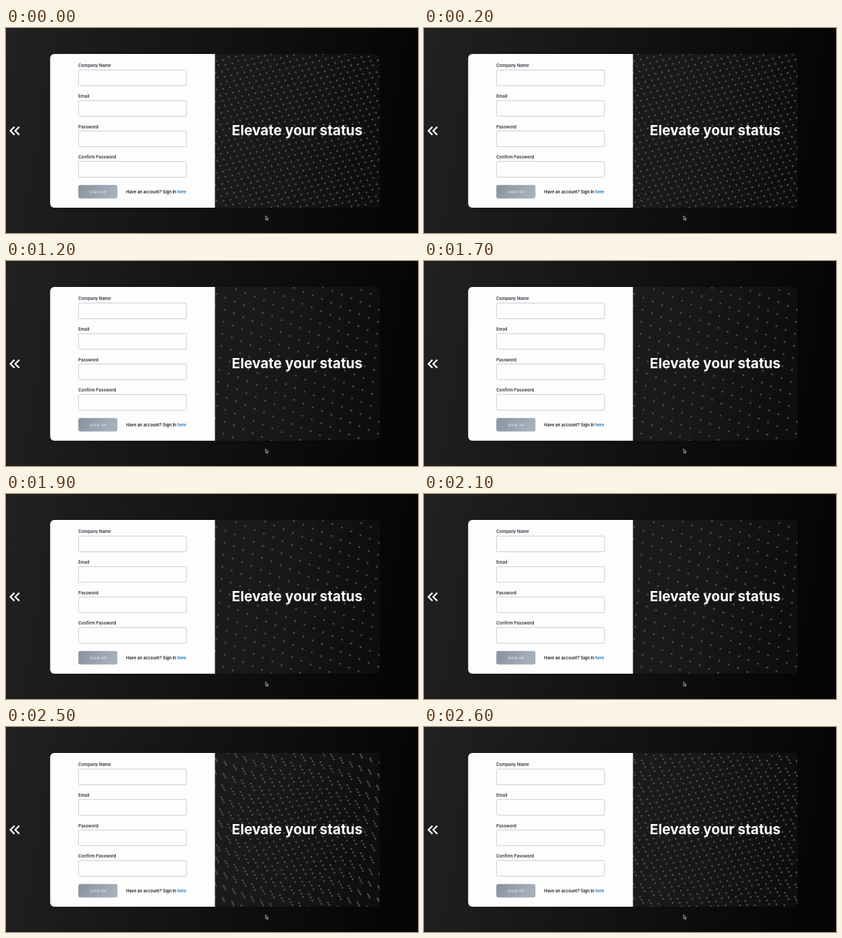
Write an HTML page that moves like this. It is 600x300 px and loops after 2700 ms.

```html
<!DOCTYPE html>
<html lang="en">
<head>
<meta charset="utf-8">
<title>Sign up</title>
<style>
  html, body { margin: 0; width: 100%; height: 100%; overflow: hidden; background: #0e0e0e; }
  svg { display: block; width: 600px; height: 300px; }
  text { font-family: Inter, sans-serif; font-weight: 600; }
  .label { font-size: 6.2px; fill: #27303b; }
  .field { fill: #fdfdfd; stroke: #c6c8ca; stroke-width: .9; }
  .button { font-size: 5.2px; font-weight: 500; letter-spacing: .5px; fill: #e6e9ed; }
  .account { font-size: 6px; fill: #15181c; }
  .link { fill: #1670ad; }
  .title { font-size: 20.4px; font-weight: 700; fill: #fff; }
  #dots { fill: none; stroke: #4b4b4b; stroke-width: 2.9; stroke-linecap: round; }
</style>
</head>
<body>
<svg viewBox="0 0 600 300">
  <defs>
    <linearGradient id="page" x2="1" y2=".08">
      <stop stop-color="#212121"/><stop offset=".5" stop-color="#131313"/><stop offset="1" stop-color="#050505"/>
    </linearGradient>
    <linearGradient id="panel" x2="1" y2=".1">
      <stop stop-color="#1c1c1c"/><stop offset=".5" stop-color="#171717"/><stop offset="1" stop-color="#0e0e0e"/>
    </linearGradient>
    <linearGradient id="steel" x2="1" y2=".2">
      <stop stop-color="#88939e"/><stop offset="1" stop-color="#a6b0bc"/>
    </linearGradient>
    <filter id="shadow" x="-20%" y="-20%" width="140%" height="140%">
      <feDropShadow dx="0" dy="1" stdDeviation="4" flood-color="#000" flood-opacity=".15"/>
    </filter>
    <clipPath id="right"><path d="M304 38H538a6 6 0 0 1 6 6V257a6 6 0 0 1-6 6H304Z"/></clipPath>
  </defs>

  <rect width="600" height="300" fill="url(#page)"/>
  <rect x="64.3" y="38" width="479.7" height="225" rx="6" fill="url(#panel)" filter="url(#shadow)"/>
  <g clip-path="url(#right)">
    <rect x="304" y="38" width="240" height="225" fill="url(#panel)"/>
    <path id="dots"/>
  </g>
  <path d="M70.3 38H304.3V263H70.3a6 6 0 0 1-6-6V44a6 6 0 0 1 6-6Z" fill="#fdfdfd"/>

  <g id="form"></g>
  <rect x="105.3" y="229.8" width="57" height="19.6" rx="3" fill="url(#steel)"/>
  <text class="button" x="122" y="241.5">SIGN UP</text>
  <text class="account" x="175" y="241.6">Have an account? Sign In <tspan class="link">here</tspan></text>

  <text class="title" x="424" y="157.3" text-anchor="middle">Elevate your status</text>
  <path d="M12.3 144.6 6.4 150.5l5.9 5.9M19.3 144.6l-5.9 5.9 5.9 5.9" fill="none" stroke="#fff" stroke-width="2.2"/>
  <path d="M378 274.8v6l1.4-1.3 1 2.2 1-.4-1-2.2h1.9Z" fill="#111" stroke="#ddd" stroke-width=".7"/>
</svg>
<script>
  const LOOP = 2700;
  const STEPS = [0, 100, 200, 300, 1200, 1400, 1700, 1900, 2100, 2200, 2300, 2400, 2500, 2600];
  const CENTER = { x: 424, y: 150.5 };
  const A = { x: 13.6, y: 5.5 };
  const B = { x: -1.5, y: 17.6 };
  const SPLIT = { x: (A.x + B.x) / 3, y: (A.y + B.y) / 3 };

  const form = document.getElementById("form");
  form.innerHTML = ["Company Name", "Email", "Password", "Confirm Password"].map((label, i) => {
    const y = i * 44.6;
    return `<text class="label" x="105.3" y="${57.4 + y}">${label}</text>
      <rect class="field" x="105.6" y="${61.6 + y}" width="157.3" height="22.9" rx="1.8"/>`;
  }).join("");

  const lattice = [];
  for (let i = -13; i <= 13; i++) {
    for (let j = -14; j <= 14; j++) {
      const x = CENTER.x + i * A.x + j * B.x;
      const y = CENTER.y + i * A.y + j * B.y;
      if (x > 290 && x < 558 && y > 22 && y < 278) {
        lattice.push({ x, y, r: Math.hypot(x - CENTER.x, y - CENTER.y) });
      }
    }
  }

  const ease = p => p * p * (3 - 2 * p);
  const clamp = v => Math.min(1, Math.max(0, v));
  const dot = (x, y) => `M${x.toFixed(2)} ${y.toFixed(2)}h0`;

  // Each dot sends one copy to either side, starting from the centre of the panel.
  function dotsAt(time) {
    const elapsed = time < 1200 ? time + 700 : time - 2000;
    return lattice.map(({ x, y, r }) => {
      const k = ease(clamp((elapsed - r * 2.2) / 500));
      const sides = k > 0 ? [-k, 0, k] : [0];
      return sides.map(s => dot(x + SPLIT.x * s, y + SPLIT.y * s)).join("");
    }).join("");
  }

  const dots = document.getElementById("dots");
  const start = performance.now();
  let shown = -1;

  function draw() {
    const time = (performance.now() - start) % LOOP;
    const step = STEPS.filter(s => s <= time).pop();
    if (step !== shown) {
      dots.setAttribute("d", dotsAt(step));
      shown = step;
    }
    requestAnimationFrame(draw);
  }
  draw();
</script>
</body>
</html>
```
